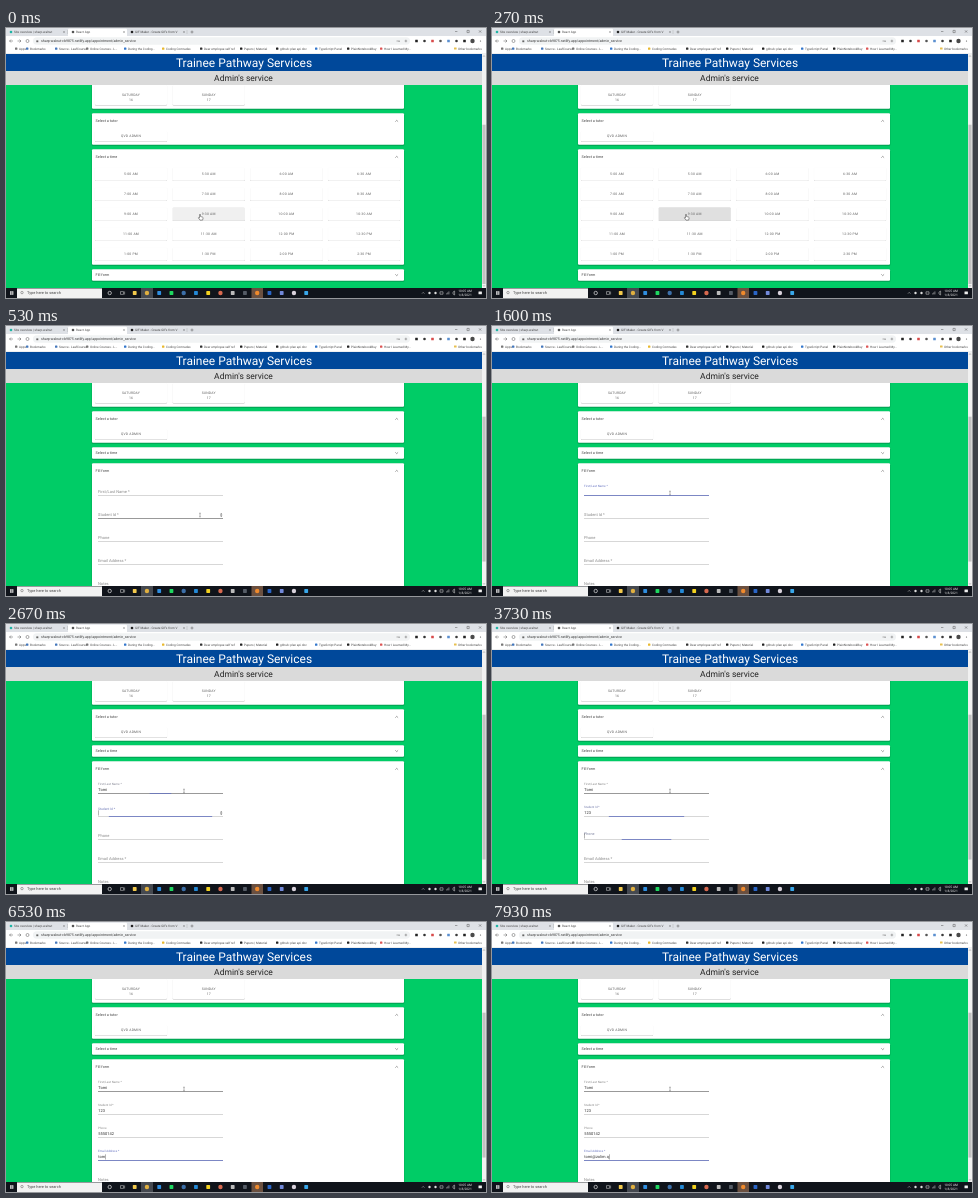
Write an HTML page that moves like this. It is 480 px wide and 270 px high and loops after 8 s.

```html
<!DOCTYPE html>
<html lang="en">
<head>
<meta charset="utf-8">
<title>Appointment form</title>
<style>
  html, body { margin: 0; width: 100%; height: 100%; overflow: hidden; background: #00cc66; }
  svg { display: block; }
  #stage { width: 100vw; height: 100vh; }
  text { font-family: Roboto, Arial, sans-serif; text-rendering: geometricPrecision; white-space: pre; }
</style>
</head>
<body>
<svg id="stage" viewBox="0 0 480 270"></svg>
<script>
const LOOP = 8000;
const stage = document.getElementById('stage');
const ACCENT = '#6673c0';
const LINE = '#bcbcbc';

// ---------- drawing helpers ----------
function set(node, attrs) {
  for (const name in attrs) node.setAttribute(name, attrs[name]);
  return node;
}
function add(parent, tag, attrs) {
  const node = document.createElementNS('http://www.w3.org/2000/svg', tag);
  return parent.appendChild(set(node, attrs));
}
const group = parent => add(parent, 'g', {});
const rect = (parent, x, y, width, height, fill, rx = 0) =>
  add(parent, 'rect', { x, y, width, height, fill, rx });
const dot = (parent, cx, cy, r, fill) => add(parent, 'circle', { cx, cy, r, fill });
const stroke = (parent, d, color, width = 0.5) =>
  add(parent, 'path', { d, stroke: color, 'stroke-width': width, fill: 'none' });
// y is the vertical middle of the line of text
function label(parent, x, y, content, size, fill, anchor = 'start') {
  const node = add(parent, 'text', { x, y: y + size * 0.36, 'font-size': size, fill, 'text-anchor': anchor });
  node.textContent = content;
  return node;
}
const move = (node, x, y) => node.setAttribute('transform', `translate(${x} ${y})`);
const show = (node, visible) => node.setAttribute('visibility', visible ? 'visible' : 'hidden');

// ---------- easing ----------
const clamp = v => Math.min(1, Math.max(0, v));
function bezier(x1, y1, x2, y2) {
  const at = (a, b, s) => 3 * a * s * (1 - s) ** 2 + 3 * b * s * s * (1 - s) + s ** 3;
  return x => {
    if (x <= 0 || x >= 1) return clamp(x);
    let low = 0, high = 1;
    for (let i = 0; i < 24; i++) {
      const mid = (low + high) / 2;
      if (at(x1, x2, mid) < x) low = mid; else high = mid;
    }
    return at(y1, y2, low);
  };
}
const standard = bezier(0.4, 0, 0.2, 1);
const swift = bezier(0.25, 0.8, 0.25, 1);

// ---------- page ----------
const COLUMNS = [125, 202.7, 280.4, 358.1];

function button(parent, cx, cy, content, fill = '#fff', height = 13.4) {
  const x = cx - 36, y = cy - height / 2;
  rect(parent, x - 0.2, y + 0.4, 72.4, height, '#f0f0f0', 1);
  rect(parent, x, y + height - 1, 72, 1.4, '#c6c6c6', 0.8);
  const face = rect(parent, x, y, 72, height, fill, 1);
  if (content) label(parent, cx, cy, content, 3.4, '#606060', 'middle').setAttribute('letter-spacing', 0.2);
  return face;
}
// A white card with a soft shadow; returns a function that sets its height
function card(parent, height) {
  const layers = [
    rect(parent, 85.4, 0.4, 313.2, 0, 'rgba(0,0,0,.1)', 1.2),
    rect(parent, 85.9, 0.4, 312.2, 0, 'rgba(0,0,0,.16)', 1),
    rect(parent, 86, 0.2, 312, 0, '#fff', 1)
  ];
  const resize = h => layers.forEach((layer, i) => layer.setAttribute('height', h + [0.5, 0.1, -0.4][i]));
  resize(height);
  return resize;
}
function panelHeader(parent, title) {
  const head = group(parent);
  label(head, 89.6, 0, title, 3.75, '#444');
  const chevron = stroke(head, 'M-1.4 .7L0 -.7L1.4 .7', '#666', 0.6);
  return {
    place(height, open) {
      move(head, 0, height / 2);
      chevron.setAttribute('transform', `translate(390.7 0) rotate(${180 * (1 - open)})`);
    }
  };
}

rect(stage, 0, 0, 480, 270, '#00cc66');
const days = group(stage);
move(days, 0, 50);
card(days, 31);
[['SATURDAY', '16'], ['SUNDAY', '17']].forEach(([day, date], i) => {
  button(days, COLUMNS[i], 17, '', '#fff', 20);
  label(days, COLUMNS[i], 16.3, day, 3.4, '#606060', 'middle').setAttribute('letter-spacing', 0.2);
  label(days, COLUMNS[i], 22, date, 3.4, '#606060', 'middle');
});

const tutor = group(stage);
move(tutor, 0, 85);
card(tutor, 32);
panelHeader(tutor, 'Select a tutor').place(16, 1);
button(tutor, COLUMNS[0], 23, 'QVD ADMIN', '#fff', 11);

const timePanel = group(stage);
move(timePanel, 0, 121);
const resizeTime = card(timePanel, 116);
const timeHeader = panelHeader(timePanel, 'Select a time');
const timeBody = add(timePanel, 'svg', { x: 0, width: 480, overflow: 'hidden' });
let picked;
for (let i = 0; i < 20; i++) {
  const hour = 5 + Math.floor(i / 2);
  const name = `${(hour - 1) % 12 + 1}:${i % 2 ? '30' : '00'} ${hour < 12 ? 'AM' : 'PM'}`;
  const face = button(timeBody, COLUMNS[i % 4], 9 + 20 * Math.floor(i / 4), name);
  if (i === 9) picked = face;
}

const formPanel = group(stage);
const resizeForm = card(formPanel, 12);
const formHeader = panelHeader(formPanel, 'Fill form');
const formBody = add(formPanel, 'svg', { x: 0, width: 480, overflow: 'hidden' });

// focus and blur are times in ms; keys holds the time of each typed character
const fields = [
  { name: 'First/Last Name *', value: 'Tomi', focus: 1060, blur: 2570, keys: [1870, 2070, 2130, 2270] },
  { name: 'Student Id *', value: '123', focus: 2570, blur: 3694, keys: [3000, 3200, 3470] },
  { name: 'Phone', value: '5550142', focus: 3694, blur: 5700, keys: [4270, 4400, 4600, 4800, 5000, 5200, 5400] },
  { name: 'Email Address *', value: 'tomi@zolim.q', focus: 5700, blur: Infinity,
    keys: [6330, 6400, 6530, 6600, 6870, 7070, 7130, 7270, 7330, 7470, 7730, 7930] },
  { name: 'Notes', value: '', focus: Infinity, blur: Infinity, keys: [] }
];
fields.forEach((field, i) => {
  const g = group(formBody);
  move(g, 92, 13 + 23 * i);
  field.line = rect(g, 0, 3.3, 125, 0.6, LINE);
  field.ripple = rect(g, 0, 3.2, 0, 0.8, ACCENT);
  field.title = label(g, 0, 0, field.name, 4, '#888');
  field.text = label(g, 0.3, 0, '', 4, '#333');
  field.caret = rect(g, 0, -2.7, 0.4, 5.2, '#444');
});
const spinner = add(formBody, 'path', { d: 'M214 35.4l1.2 -1.5l1.2 1.5zM214 36.6l1.2 1.5l1.2 -1.5z', fill: '#666' });

// site header and scrollbar
rect(stage, 0, 26, 480, 17, '#00489a');
label(stage, 238, 34.7, 'Trainee Pathway Services', 12, '#fff', 'middle');
rect(stage, 0, 43, 480, 14, '#dadada');
label(stage, 237.5, 50, "Admin's service", 8.5, '#222', 'middle');
rect(stage, 476, 26, 4, 234, '#f1f1f1');
stroke(stage, 'M477.2 28.6l.8 -.9l.8 .9M477.2 257.4l.8 .9l.8 -.9', '#666');
const thumb = rect(stage, 476.4, 97, 3.2, 159, '#c1c1c1');

// ---------- browser frame ----------
rect(stage, 0, 0, 480, 8, '#dee1e6');
rect(stage, 0, 8, 480, 18, '#fff');
rect(stage, 62, 0.8, 59, 8, '#fff', 1);
[
  [5, '#20b5a5', 'Site overview | sharp-walnut'],
  [67, '#555', 'React App'],
  [126, '#222', 'GIF Maker - Create GIFs from V']
].forEach(([x, color, title]) => {
  dot(stage, x, 4, 1.3, color);
  label(stage, x + 3, 4, title, 3.1, '#444');
});
[58, 118, 178].forEach(x => stroke(stage, `M${x - 0.8} 3.2l1.6 1.6m0 -1.6l-1.6 1.6`, '#555', 0.4));
stroke(stage, 'M61.5 2v4M181 2v4', '#999', 0.3);
stroke(stage, 'M184.5 4h3M186 2.5v3M449 3.5h2.4M461 2.4h2.2v2.2h-2.2zM473 2.4l2.2 2.2m0 -2.2l-2.2 2.2', '#333', 0.4);

rect(stage, 27, 9.3, 377, 7.4, '#f1f3f4', 3.7);
stroke(stage, 'M7 13H3.5l1.5 -1.5m-1.5 1.5l1.5 1.5M11.5 13H15l-1.5 -1.5m1.5 1.5l-1.5 1.5', '#555');
add(stage, 'circle', { cx: 21.5, cy: 13, r: 1.5, fill: 'none', stroke: '#555', 'stroke-width': 0.5 });
rect(stage, 30.3, 12.4, 2, 1.8, '#666');
label(stage, 35, 13, 'sharp-walnut-cb9875.netlify.app/appointment/admin_service', 3.5, '#333');
stroke(stage, 'M390.5 13h3.4m-.8 0v1M398.6 13h2.6m-1.3 -1.3v2.6', '#666');
['#222', '#333', '#d84a4a', '#555', '#5a8fd0', '#3b3b3b', '#222'].forEach((color, i) =>
  i % 2 ? dot(stage, 410.5 + 8 * i, 13, 1.3, color) : rect(stage, 409.2 + 8 * i, 11.7, 2.6, 2.6, color, 0.3));
dot(stage, 466.5, 13, 2.2, '#4a4a4a');
dot(stage, 474.5, 13, 0.6, '#555');

[
  [9, '#777', 'Apps'], [20, '#47b', 'Bookmarks'], [49, '#47b', 'Source - LeafCourse'], [80, '#777', 'Online Courses - L...'],
  [118, '#37c', 'During the Coding...'], [156, '#e9b92f', 'Coding Comrades'], [194, '#333', 'Dear employee self ref'],
  [234, '#222', 'Papers | Material'], [270, '#222', 'github: plan api doc'], [309, '#37c', 'TypeScript Panel'],
  [341, '#222', 'PlainNotebookBuy'], [374, '#d55', 'How I Learned My...']
].forEach(([x, color, title]) => {
  rect(stage, x, 19.4, 2.4, 2.4, color, 0.5);
  label(stage, x + 4, 20.6, title, 3.1, '#444');
});
rect(stage, 448, 19.4, 2.6, 2.2, '#e8c04f', 0.3);
label(stage, 452, 20.6, 'Other bookmarks', 3.1, '#444');
rect(stage, 0, 25.6, 480, 0.4, '#d5d7da');

// ---------- taskbar ----------
rect(stage, 0, 260, 480, 10, '#10141b');
rect(stage, 11, 260.4, 85, 9.6, '#f2f2f2');
rect(stage, 4, 263.3, 3.4, 3.4, '#e8e8e8');
stroke(stage, 'M4 265h3.4M5.7 263.3v3.4', '#10141b', 0.4);
add(stage, 'circle', { cx: 16, cy: 264.6, r: 1.2, fill: 'none', stroke: '#333', 'stroke-width': 0.4 });
label(stage, 21, 265, 'Type here to search', 3.9, '#444');
rect(stage, 135, 260, 12, 10, '#454950');
rect(stage, 245.5, 260, 11.5, 10, '#6b5040');
add(stage, 'circle', { cx: 103.7, cy: 265, r: 1.7, fill: 'none', stroke: '#fff', 'stroke-width': 0.6 });
stroke(stage, 'M114.5 263.6h3v2.8h-3zM118.6 263.5v3', '#ddd', 0.5);
['#f2c94c', '#e0b040', '#2f8ee0', '#1ed760', '#3c6fa8', '#2489d6', '#f4d21f', '#d7694f', '#bbb',
  '#555c66', '#f08a2c', '#2a65c7', '#7289da', '#d9d2dc', '#39a7ea'].forEach((color, i) => {
  const x = 128.7 + 12.25 * i;
  i % 3 === 1 ? dot(stage, x, 265, 2.2, color) : rect(stage, x - 1.9, 263.1, 3.8, 3.8, color, 0.6);
});
stroke(stage, 'M416 265.6l1.2 -1.2l1.2 1.2M434 263.8h3v2.4h-3zM440.5 266.4v-1m1.2 1v-2m1.2 2v-3M447 264v2l1.6 1v-4z', '#ddd');
[423.5, 429.5].forEach(x => dot(stage, x, 265, 1.2, '#ddd'));
label(stage, 459, 262.9, '10:05 AM', 3.2, '#eee', 'middle');
label(stage, 459, 267.2, '1/8/2021', 3.2, '#eee', 'middle');
rect(stage, 472.5, 263.4, 3.4, 2.8, '#eee', 0.3);

// ---------- pointer ----------
const hand = add(stage, 'path', {
  d: 'M-.5 0q.5 -.6 1 0v2l2.1 .6q.6 .2 .5 1l-.5 2h-2.6l-1.7 -2.2q0 -.8 1.2 0z',
  fill: '#fff', stroke: '#222', 'stroke-width': 0.45
});
const beam = stroke(stage, 'M-.8 -1.8h1.6M0 -1.8v3.6M-.8 1.8h1.6', '#444', 0.4);
const pointerPath = [[0, 194, 186.5], [270, 194, 186.5], [400, 192, 187], [500, 194, 189], [600, 194, 189], [1000, 178, 167]];

function pointerAt(t) {
  const next = pointerPath.findIndex(stop => stop[0] > t);
  if (next < 0) return pointerPath[pointerPath.length - 1].slice(1);
  const [t0, x0, y0] = pointerPath[next - 1], [t1, x1, y1] = pointerPath[next];
  const k = standard((t - t0) / (t1 - t0));
  return [x0 + (x1 - x0) * k, y0 + (y1 - y0) * k];
}

function drawField(field, t, hovered) {
  const since = t - field.focus;
  const floated = swift(since / 400);
  const ripple = swift(since / 300) - swift((t - field.blur) / 300);
  const typed = field.keys.filter(key => key <= t + 4);
  const focused = t >= field.focus && t < field.blur;

  field.title.setAttribute('transform', `translate(0 ${-6.5 * floated}) scale(${1 - 0.25 * floated})`);
  field.title.style.fill = `color-mix(in srgb, ${ACCENT} ${100 * ripple}%, #888)`;
  field.text.textContent = field.value.slice(0, typed.length);
  set(field.ripple, { x: 62.5 * (1 - ripple), width: 125 * ripple });
  set(field.line, { fill: hovered && !focused ? '#555' : LINE });

  const lastInput = typed.length ? typed[typed.length - 1] : field.focus;
  show(field.caret, focused && Math.floor(Math.max(0, t - lastInput) / 500) % 2 === 0);
  field.caret.setAttribute('x', 0.4 + (typed.length ? field.text.getComputedTextLength() : 0));
}

function draw(t) {
  const open = standard((t - 279) / 225);
  const timeHead = 16 - 4 * open, timeRest = 100 * (1 - open);
  const formHead = 12 + 4 * open, formRest = 133 * open;
  const formTop = 125 + timeHead + timeRest;

  timeHeader.place(timeHead, 1 - open);
  resizeTime(timeHead + timeRest);
  set(timeBody, { y: timeHead, height: timeRest });
  show(timeBody, timeRest > 0);
  const press = Math.round(240 - 16 * clamp((t - 65) / 200));
  picked.setAttribute('fill', `rgb(${press},${press},${press})`);

  move(formPanel, 0, formTop);
  formHeader.place(formHead, open);
  resizeForm(formHead + formRest);
  set(formBody, { y: formHead, height: formRest });
  show(formBody, formRest > 0);

  const pageHeight = 332 + 33 * open;
  set(thumb, { y: 30 + 226 * 98 / pageHeight, height: 226 * 234 / pageHeight });

  const [px, py] = pointerAt(t);
  const firstField = formTop + formHead + 13;
  const hovered = open > 0.5 ? fields.findIndex((_, i) => Math.abs(py - firstField - 23 * i) < 7) : -1;
  fields.forEach((field, i) => drawField(field, t, i === hovered));
  show(spinner, open > 0 && (hovered === 1 || (t >= fields[1].focus && t < fields[1].blur)));

  const overText = t > 450;
  show(hand, !overText);
  show(beam, overText);
  move(hand, px, py);
  move(beam, px, py);
}

function tick() {
  draw(performance.now() % LOOP);
  requestAnimationFrame(tick);
}
tick();
</script>
</body>
</html>
```
